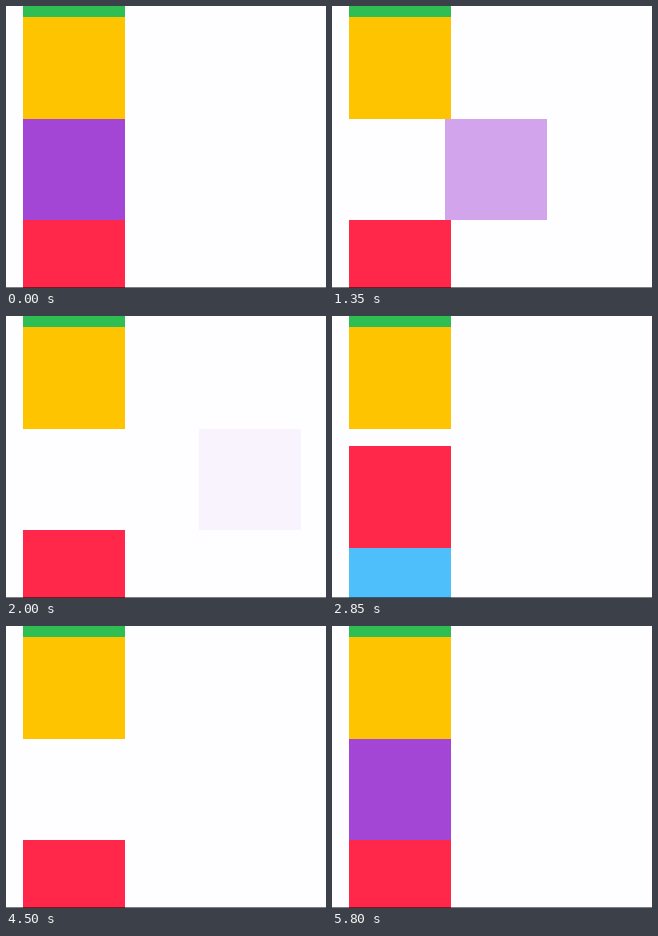
An HTML page for the animation above (6550 ms loop, 320 px wide and 282 px high).

```html
<!DOCTYPE html>
<html lang="en">
<head>
<meta charset="utf-8">
<title>List item removal and insertion</title>
<style>
  html, body { margin: 0; width: 100%; height: 100%; overflow: hidden; background: #fefdff; }
  svg { display: block; width: 320px; height: 282px; }
</style>
</head>
<body>
<svg viewBox="0 0 320 282" shape-rendering="crispEdges">
  <g id="list"></g>
  <rect y="281" width="320" height="1" fill="#000" fill-opacity=".5"/>
</svg>
<script>
const LOOP = 6550;
const SIZE = 101.5, LEFT = 17, TOP = 11.2;
const SLIDE = 187;
const list = document.getElementById('list');

function addCell(row, fill) {
  const cell = document.createElementNS('http://www.w3.org/2000/svg', 'rect');
  const attrs = { x: LEFT, y: TOP + row * SIZE, width: SIZE, height: SIZE, fill };
  for (const key in attrs) cell.setAttribute(key, attrs[key]);
  list.append(cell);
  return cell;
}

addCell(-1, '#2fbe53');
addCell(0, '#ffc400');
const item = addCell(1, '#a346d6');
const red = addCell(2, '#ff284b');
const blue = addCell(3, '#4fbffb');

const clamp = v => Math.min(1, Math.max(0, v));
const progress = (t, start, length) => clamp((t - start) / length);

// cubic-bezier(.42, 0, .58, 1)
function easeInOut(p) {
  let lo = 0, hi = 1;
  for (let i = 0; i < 24; i++) {
    const s = (lo + hi) / 2, r = 1 - s;
    const x = 1.26 * r * r * s + 1.74 * r * s * s + s * s * s;
    if (x < p) lo = s; else hi = s;
  }
  return lo * lo * (3 - 2 * lo);
}

// Remaining distance of an underdamped spring, damping ratio 0.5
function spring(sec) {
  const decay = 6.5, freq = decay * Math.sqrt(3);
  return Math.exp(-decay * sec) *
    (Math.cos(freq * sec) + decay / freq * Math.sin(freq * sec));
}

function itemOffset(t) {
  if (t < 4786) return easeInOut(progress(t, 335, 2000));
  return t < 5800 ? spring((t - 4786) / 1000) : 0;
}

function draw(t) {
  const offset = itemOffset(t);
  item.setAttribute('x', LEFT + SLIDE * offset);
  item.setAttribute('opacity', clamp(1 - offset));

  const shift = easeInOut(progress(t, 2616, 330)) - easeInOut(progress(t, 4174, 330));
  red.setAttribute('y', TOP + (2 - shift) * SIZE);
  blue.setAttribute('y', TOP + (3 - shift) * SIZE);
}

const begin = performance.now();
function tick() {
  draw((performance.now() - begin) % LOOP);
  requestAnimationFrame(tick);
}
tick();
</script>
</body>
</html>
```
